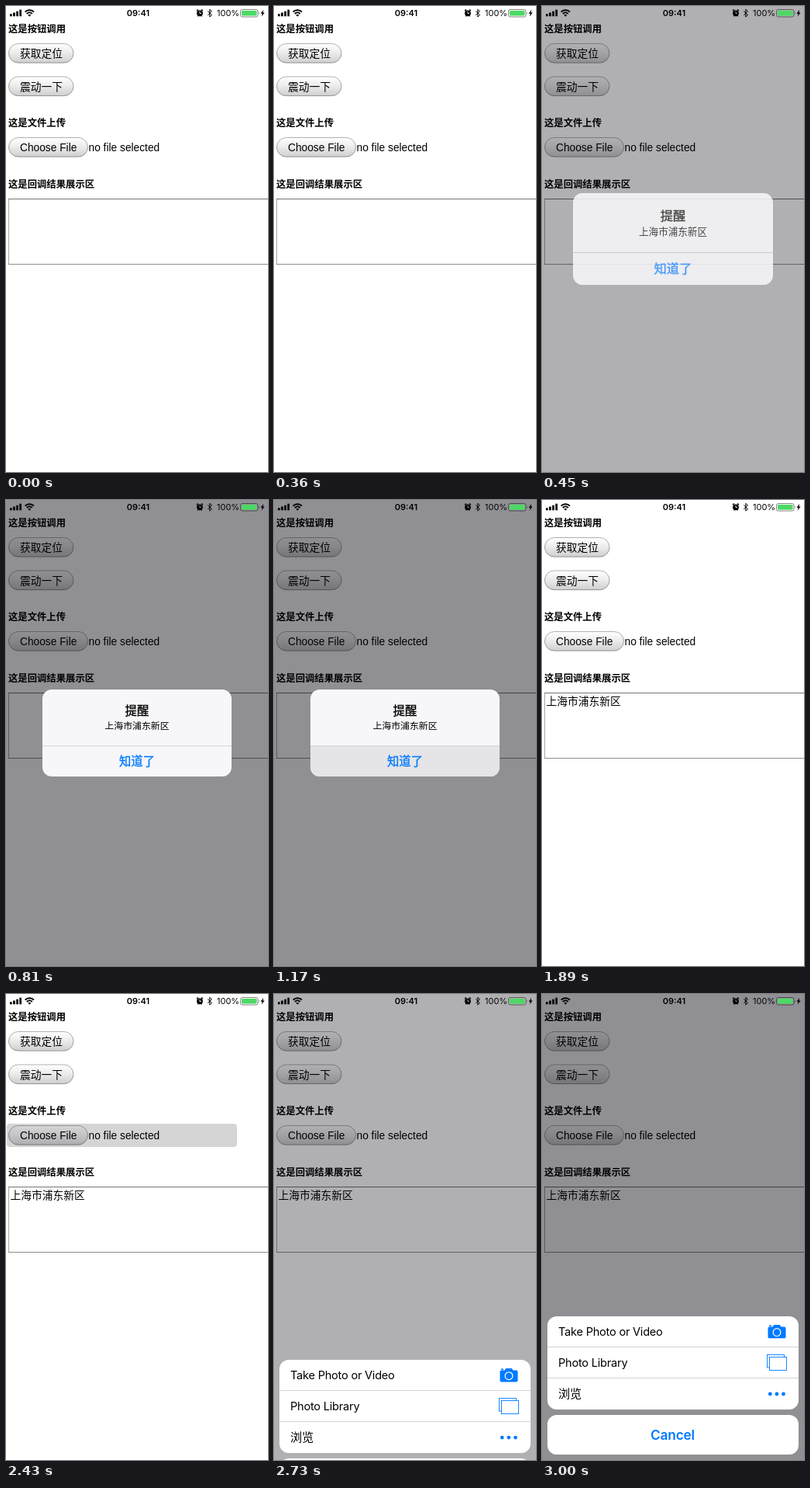
An HTML page for the animation above (3.03 s loop, 338 by 600 pixels).

```html
<!DOCTYPE html>
<html lang="zh-CN">
<head>
<meta charset="utf-8">
<title>Alert and file sheet</title>
<style>
  html, body { margin: 0; width: 100%; height: 100%; overflow: hidden; background: #fff; }
  svg { display: block; width: 338px; height: 600px; }
  text { font-family: "Liberation Sans", "Noto Sans CJK SC", "Noto Sans CJK", sans-serif; font-size: 13.75px; }
  .heading { font-size: 12.35px; font-weight: 700; }
  .status { font-family: Inter, sans-serif; font-size: 11px; }
  .mid { text-anchor: middle; }
  .strong { font-size: 15.4px; stroke: currentColor; stroke-width: .32px; }
  .row { font-family: Inter, "Noto Sans CJK SC", "Noto Sans CJK", sans-serif; font-size: 14.6px; letter-spacing: -.24px; }
  .cancel { font-family: Inter, sans-serif; font-size: 17.3px; font-weight: 600; letter-spacing: -.2px; }
  .blue { fill: #007aff; color: #007aff; }
  .button rect { fill: url(#shine); stroke: url(#rim); stroke-width: .9; }
  .divider { stroke: #c9c8cc; stroke-width: .8; }
</style>
</head>
<body>
<svg viewBox="0 0 338 600">
  <defs>
    <linearGradient id="shine" x2="0" y2="1">
      <stop offset="0" stop-color="#fff"/>
      <stop offset=".45" stop-color="#ededee"/>
      <stop offset="1" stop-color="#cfcfd0"/>
    </linearGradient>
    <linearGradient id="rim" x2="0" y2="1">
      <stop offset="0" stop-color="#a8a8a8"/>
      <stop offset="1" stop-color="#858585"/>
    </linearGradient>
    <clipPath id="alertShape"><rect x="47" y="244" width="244" height="112" rx="12"/></clipPath>
  </defs>
  <rect width="338" height="600" fill="#fff"/>

  <g id="statusBar">
    <path d="M5 10.2h2.7v3H5zM9.1 8.6h2.7v4.6H9.1zM13.2 6.8h2.7v6.4h-2.7zM17.3 4.8H20v8.4h-2.7z"/>
    <path d="M24.6 7.6a8 8 0 0 1 11.4 0M26.8 10a5 5 0 0 1 7 0" fill="none" stroke="#000" stroke-width="1.9"/>
    <path d="M28.3 11.6a2.9 2.9 0 0 1 4 0L30.3 13.7z"/>
    <text class="status mid" x="170.5" y="13" font-weight="600">09:41</text>
    <circle cx="250" cy="9.3" r="3.9"/>
    <path d="M246 6.2l2-1.8M254 6.2l-2-1.8M247.4 13.4l1-1.2M252.6 13.4l-1-1.2" stroke="#000" stroke-width="1.3"/>
    <path d="M250 7v2.6h2" fill="none" stroke="#fff" stroke-width=".9"/>
    <path d="M260.3 6.6l5.2 5-2.7 2.4V4.4l2.7 2.4-5.2 5" fill="none" stroke="#000"/>
    <text class="status" x="272" y="13">100%</text>
    <rect x="302.5" y="4.5" width="22.5" height="9.5" rx="2.4" fill="none" stroke="#777" stroke-width=".9"/>
    <path d="M326 7.6q1.4 1.6 0 3.3z" fill="#777"/>
    <path d="M332.2 4.8l-3.7 5h2.1l-.9 3.8 3.9-5.2h-2.2z"/>
  </g>

  <text class="heading" x="3" y="34">这是按钮调用</text>
  <text class="heading" x="3" y="155">这是文件上传</text>
  <text class="heading" x="3" y="234">这是回调结果展示区</text>

  <g class="button"><rect x="3.5" y="48.5" width="83.5" height="24.6" rx="12.3"/><text x="18" y="66.3">获取定位</text></g>
  <g class="button"><rect x="3.5" y="91" width="83.5" height="24.6" rx="12.3"/><text x="18" y="108.8">震动一下</text></g>
  <g class="button"><rect x="3.5" y="169.5" width="102" height="24.6" rx="12.3"/><text x="18" y="187">Choose File</text></g>
  <text x="106.5" y="187">no file selected</text>

  <path d="M3.5 248v85" stroke="#a5a5a5"/>
  <path d="M3 248.5h335" stroke="#757575"/>
  <path d="M3 332.5h335" stroke="#8c8c8c"/>
  <text id="result" x="5.5" y="264">上海市浦东新区</text>

  <rect id="buttonTap" x="1" y="46" width="89" height="30" rx="4" fill="#05000a" opacity="0"/>
  <rect id="fileTap" x="1" y="167" width="297" height="30" rx="4" fill="#05000a" opacity="0"/>
  <rect id="dim" width="338" height="600" fill="#02000a" opacity="0"/>
  <rect x="304" y="6" width="19.5" height="6.5" rx="1" fill="#4cd964"/>

  <g id="alert">
    <g id="alertBox" clip-path="url(#alertShape)">
      <rect x="47" y="244" width="244" height="112" fill="#f7f6f9"/>
      <rect id="alertPress" x="47" y="317" width="244" height="39" fill="#e5e4e7"/>
      <path class="divider" d="M47 316.6h244"/>
    </g>
    <g id="alertText">
      <text class="mid strong" x="169" y="277">提醒</text>
      <text class="mid" x="169" y="295" style="font-size:11.9px">上海市浦东新区</text>
      <text class="mid strong blue" x="169" y="342">知道了</text>
    </g>
  </g>

  <g id="sheet">
    <rect x="7" y="415" width="324" height="120" rx="12" fill="#fff"/>
    <path class="divider" d="M7 454.5h324M7 494.5h324"/>
    <text class="row" x="21" y="440.3">Take Photo or Video</text>
    <text class="row" x="21" y="480.3">Photo Library</text>
    <text class="row" x="21" y="520.3" style="font-size:15.2px">浏览</text>
    <g class="blue">
      <path d="M293 428.5h4.6l1.6-2.5h7.6l1.6 2.5h4.2q1.9 0 1.9 1.9v11q0 1.9-1.9 1.9h-19.2q-1.9 0-1.9-1.9v-11q0-1.9 1.5-1.9z"/>
      <path d="M293 426.4h3v1.5h-3z"/>
      <circle cx="303" cy="435.6" r="4.9" fill="none" stroke="#fff" stroke-width="1.2"/>
      <circle cx="294.3" cy="515" r="2.4"/><circle cx="302.9" cy="515" r="2.4"/><circle cx="311.5" cy="515" r="2.4"/>
    </g>
    <g fill="#fff" stroke="#007aff" stroke-width=".9">
      <rect x="290.5" y="464.5" width="22" height="16.5"/>
      <rect x="293.5" y="467.5" width="22" height="17"/>
    </g>
    <rect x="7" y="542" width="324" height="51" rx="12" fill="#fff"/>
    <text class="cancel mid blue" x="168.5" y="574">Cancel</text>
  </g>
</svg>
<script>
const LOOP = 3030, STEP = 30;
const ALERT_IN = 381, ALERT_PRESS = 1110, ALERT_OUT = 1245, RESULT_AT = 1440, SHEET_IN = 2661;
const DIM = 0.435, TAP = 0.165, SHEET_TRAVEL = 193;

const set = (id, name, value) => document.getElementById(id).setAttribute(name, value);

// Critically damped spring from 0 to 1.
function spring(t, start) {
  const x = Math.max(0, t - start) * 0.036;
  return 1 - (1 + x) * Math.exp(-x);
}

// Tap highlight: solid, then a quick fade.
function tap(t, from, to) {
  const fade = 60;
  return t >= from && t < to + fade ? TAP * Math.min(1, (to + fade - t) / fade) : 0;
}

function render(t) {
  const shown = spring(t, ALERT_IN);
  const left = 1 - spring(t, ALERT_OUT);
  const sheet = spring(t, SHEET_IN);
  const scale = 1.2 - 0.2 * shown;

  set("buttonTap", "opacity", tap(t, 210, 270));
  set("fileTap", "opacity", tap(t, 2400, 2520));
  set("dim", "opacity", DIM * Math.max(shown * left, sheet));
  set("alert", "transform", `translate(169 300) scale(${scale}) translate(-169 -300)`);
  set("alertBox", "opacity", Math.pow(shown, 0.4) * left);
  set("alertText", "opacity", shown * left);
  set("alertPress", "opacity", t >= ALERT_PRESS ? 1 : 0);
  set("result", "opacity", t >= RESULT_AT ? 1 : 0);
  set("sheet", "transform", `translate(0 ${SHEET_TRAVEL * (1 - sheet)})`);
  set("sheet", "opacity", t >= SHEET_IN ? 1 : 0);
}

const begin = performance.now();
function tick() {
  const t = (performance.now() - begin) % LOOP;
  render(Math.floor(t / STEP) * STEP);
  requestAnimationFrame(tick);
}
tick();
</script>
</body>
</html>
```
